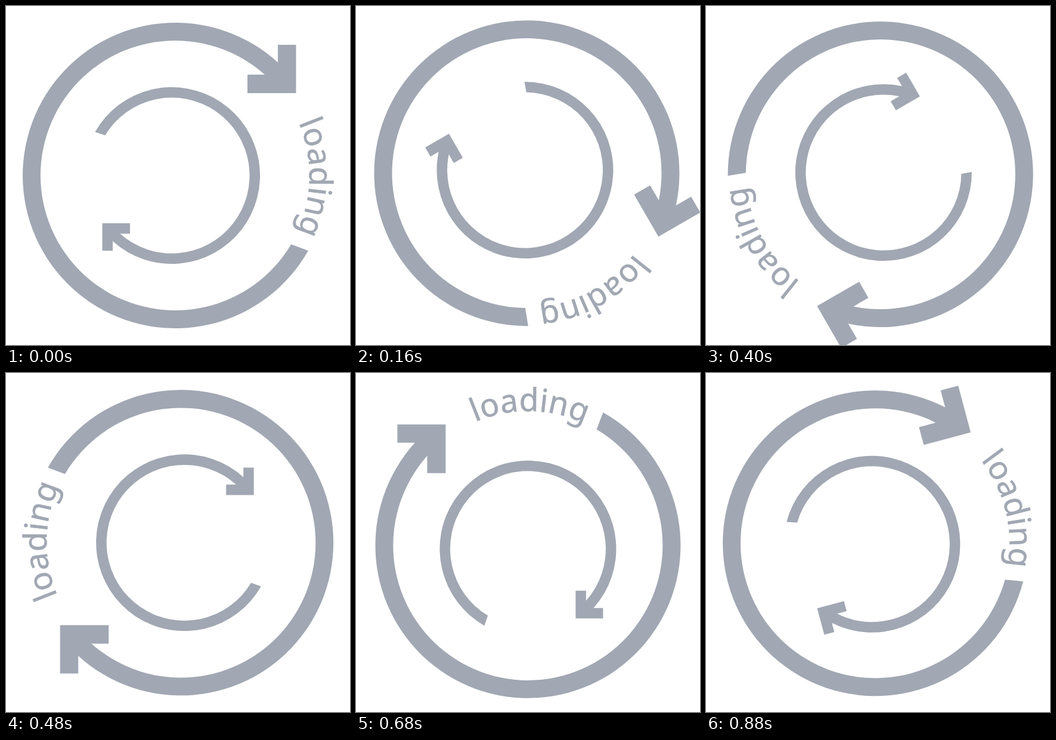
An HTML page that plays this animation: 577x568 px, repeating every 920 ms.

```html
<!DOCTYPE html>
<html lang="en">
<head>
<meta charset="utf-8">
<title>Loading</title>
<style>
  html, body { margin: 0; width: 100%; height: 100%; overflow: hidden; background: #fff; }
  svg { display: block; width: 577px; height: 568px; fill: #a1a7b3; }
  text { font: 400 53.5px "Noto Sans", sans-serif; stroke: #a1a7b3; stroke-width: .6; }
</style>
</head>
<body>
<svg viewBox="0 0 577 568">
  <defs>
    <path id="curve" d="M490.8 195.4A225 225 0 0 1 396.5 478.9"/>
  </defs>
  <g id="spinner">
    <path d="M478.3 399.2A226 226 0 1 1 434 115H405V146H486.5V65H456V94.4A256 256 0 1 0 506.9 410Z"/>
    <path d="M166.2 216.8A130.5 130.5 0 1 1 191.3 381.5H208V364H161.5V410H179V394A148 148 0 1 0 149.4 210.9Z"/>
    <text><textPath href="#curve">loading</textPath></text>
  </g>
</svg>
<script>
  const LOOP = 920, STEP = 40, TURN = 15;
  const spinner = document.getElementById("spinner");
  const start = performance.now();

  function draw(time) {
    const step = Math.floor((time % LOOP) / STEP);
    // The spin skips one position late in the turn.
    const angle = TURN * (step > 16 ? step + 1 : step);
    spinner.setAttribute("transform", `rotate(${angle} 288.6 284.2)`);
  }

  function tick() {
    draw(performance.now() - start);
    requestAnimationFrame(tick);
  }
  tick();
</script>
</body>
</html>
```
